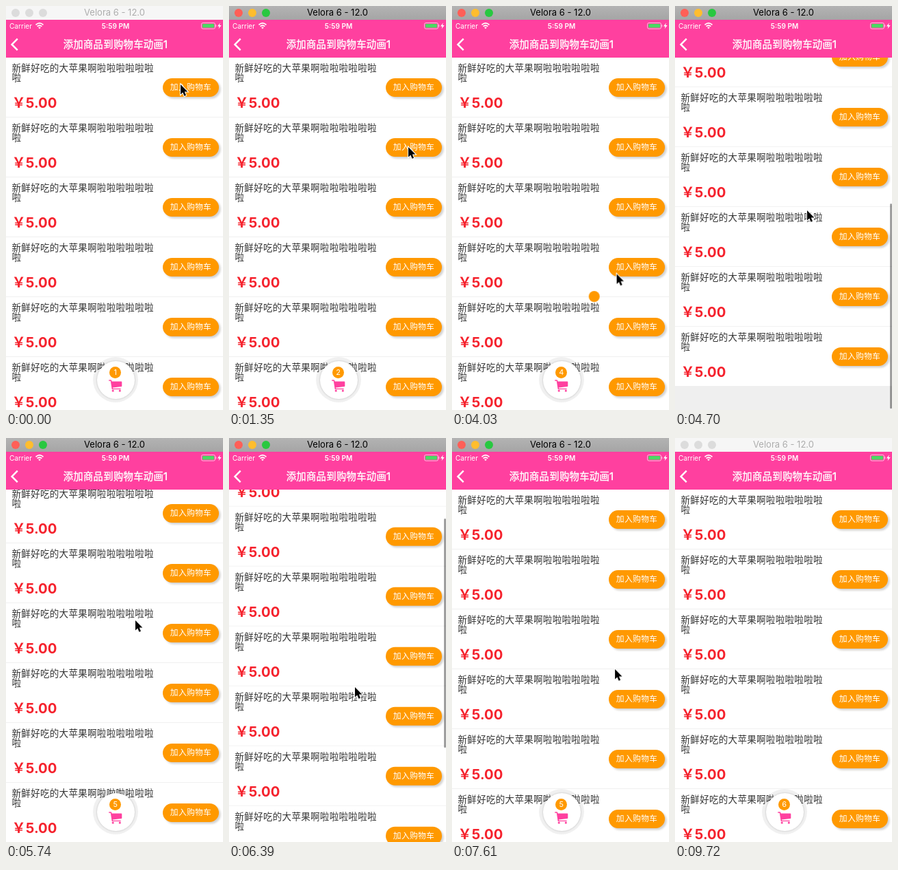
These frames come from a looping animation (317x587 px, 9750 ms). An HTML page:

```html
<!DOCTYPE html>
<html lang="zh-CN">
<head>
<meta charset="utf-8">
<title>添加商品到购物车动画1</title>
<style>
html, body { margin: 0; width: 100%; height: 100%; overflow: hidden; background: #fff; }
body { font-family: Inter, "Noto Sans CJK SC", "Noto Sans CJK", sans-serif; }
#stage { position: relative; width: 317px; height: 587px; overflow: hidden; background: #efefef; }
#stage div, #stage svg { position: absolute; white-space: nowrap; }

.bar { left: 0; top: 0; width: 317px; height: 20px; background: #f6f6f6; color: #adadad;
  font-size: 13px; line-height: 19px; text-align: center; }
.bar i { position: absolute; top: 3.5px; width: 12px; height: 12px; border-radius: 50%; background: #dcdcdc; }
.bar i:nth-of-type(1) { left: 8px; }
.bar i:nth-of-type(2) { left: 28px; }
.bar i:nth-of-type(3) { left: 48px; }
.active { background: linear-gradient(#b3b3b3, #a5a5a5); color: #000; }
.active i:nth-of-type(1) { background: #ff5f57; }
.active i:nth-of-type(2) { background: #ffbd2e; }
.active i:nth-of-type(3) { background: #28c840; }

.head { left: 0; top: 20px; width: 317px; height: 55px; background: #ff409f; color: #fff; }
.head svg { left: 0; top: -1px; }
.carrier, .clock { top: 2px; font-size: 10.1px; line-height: 14px; }
.carrier { left: 5px; }
.clock { left: 0; width: 320px; text-align: center; font-weight: 600; }
.name { left: 0; top: 26px; width: 320px; text-align: center; line-height: 20px;
  font-size: 14.37px; letter-spacing: .02em; font-weight: 500; -webkit-text-stroke: .35px #fff; }

#list { left: 0; top: 75px; width: 317px; }
.row { left: 0; width: 317px; height: 87px; background: #fff; box-shadow: inset 0 -1px #f0f0f0; }
.row .goods { left: 8.5px; top: 8px; font-size: 13.55px; letter-spacing: .02em; line-height: 14px; color: #333; }
.row .price { left: 8.5px; top: 54px; font-size: 20.3px; line-height: 24px; font-weight: 700; color: #f5222d; }
.row .add { left: 229px; top: 29.5px; width: 82px; height: 27.5px; border-radius: 14px; background: #ff9900;
  color: #fff; text-align: center; font-size: 11.83px; letter-spacing: .02em; line-height: 26.5px;
  box-shadow: 2.5px 2.5px 3px rgba(0, 0, 0, .18); }

#thumb { left: 314px; width: 2.5px; border-radius: 2px; background: rgba(0, 0, 0, .38); }
#cart { left: 127px; top: 510px; width: 66px; height: 66px; border-radius: 50%; background: rgba(0, 0, 0, .06); }
#cart .disc { left: 5.5px; top: 5.5px; width: 55px; height: 55px; border-radius: 50%; background: #fff;
  box-shadow: 0 0 3px rgba(0, 0, 0, .22); }
#cart svg { left: 23px; top: 33px; }
.badge { left: 24.2px; top: 13.5px; width: 17px; height: 17px; border-radius: 50%; overflow: hidden;
  background: #ff9900; color: #fff; font-size: 11px; line-height: 17px; text-align: center; }
#count { left: 0; top: 0; width: 17px; }
#count span { display: block; height: 17px; }

#ballX, #ballY { left: 0; top: 0; }
#ballY::before { content: ""; position: absolute; left: -8px; top: -8px; width: 16px; height: 16px;
  border-radius: 50%; background: #ff9900; }
#cursor { left: 0; top: 0; overflow: visible; }
</style>
</head>
<body>
<div id="stage">
  <div id="list"></div>
  <div id="thumb"></div>
  <div id="cart">
    <div class="disc"></div>
    <div class="badge"><div id="count"></div></div>
    <svg width="20" height="18" fill="#ff409f">
      <path d="M0 1Q0 .3.8.3H3.4Q4 .3 4.2 1L4.5 2.6H18.4Q19.3 2.6 19.3 3.4V9.2Q19.3 9.9 18.5 10L6 11.4 6.2 12.7H17Q17.8 12.7 17.8 13.4T17 14.1H5.4Q4.6 14.1 4.6 13.2L2.8 1.8H.8Q0 1.8 0 1Z"/>
      <circle cx="6.2" cy="16" r="1.6"/><circle cx="16.3" cy="16" r="1.6"/>
    </svg>
  </div>
  <div id="ballX"><div id="ballY"></div></div>

  <div class="bar"><i></i><i></i><i></i>Velora 6 - 12.0</div>
  <div class="bar active" id="active"><i></i><i></i><i></i>Velora 6 - 12.0</div>
  <div class="head">
    <div class="carrier">Carrier</div>
    <div class="clock">5:59 PM</div>
    <div class="name">添加商品到购物车动画1</div>
    <svg width="317" height="55" fill="none" stroke="#fff">
      <path d="M43.5 8.4Q49 3.4 54.5 8.4M45.6 10.7Q49 7.8 52.4 10.7" stroke-width="1.7"/>
      <path d="M47.2 12.3Q49 10.9 50.8 12.3L49 14.2Z" fill="#fff" stroke="none"/>
      <rect x="285.5" y="5.5" width="20" height="8.6" rx="2.2" stroke-opacity=".65"/>
      <rect x="287" y="7" width="17" height="5.6" rx="1" fill="#4cd964" stroke="none"/>
      <path d="M306.8 8.2V11.4" stroke-opacity=".65"/>
      <path d="M312.8 5.5L309 10.4H311.6L310.6 14.2 314.6 9H312Z" fill="#fff" stroke="none"/>
      <path d="M16.8 28.6L8.6 36.9 16.8 45.2" stroke-width="2.5"/>
    </svg>
  </div>
  <svg id="cursor" width="14" height="20">
    <path d="M0 0V14.6L3.3 11.5 5.5 16.8 8 15.7 5.8 10.6H10.4Z" stroke="#fff" stroke-width="2" paint-order="stroke"/>
  </svg>
</div>
<script>
const LOOP = 9750, ROW = 87, ROWS = 9, END = 270, FLIGHT = 500;
const $ = id => document.getElementById(id);
const sheet = document.head.appendChild(document.createElement('style'));

// Turns [ms, css, easing] steps into a looping CSS animation.
let serial = 0;
function track(el, steps, ease = 'linear') {
  const name = 'k' + serial++;
  const full = [[0, steps[0][1]], ...steps, [LOOP, steps[steps.length - 1][1]]];
  const body = full.map(([ms, css, e = ease]) =>
    `${(ms / LOOP * 100).toFixed(4)}%{${css};animation-timing-function:${e}}`).join('');
  sheet.textContent += `@keyframes ${name}{${body}}\n`;
  const old = el.style.animation;
  el.style.animation = (old ? old + ', ' : '') + `${name} ${LOOP}ms linear infinite`;
}

const clicks = [
  { row: 0, down: 120, up: 250 },
  { row: 1, down: 1450, up: 1560 },
  { row: 2, down: 2580, up: 2720 },
  { row: 3, down: 3640, up: 3750 },
  { row: 2, down: 8120, up: 8240 }
];

for (let i = 0; i < ROWS; i++) {
  $('list').insertAdjacentHTML('beforeend', `<div class="row" style="top:${i * ROW}px">
    <div class="goods">新鲜好吃的大苹果啊啦啦啦啦啦啦<br>啦</div>
    <div class="price">￥5.00</div><div class="add">加入购物车</div></div>`);
}
document.querySelectorAll('.add').forEach((button, row) => {
  const mine = clicks.filter(c => c.row === row);
  if (mine.length) track(button, mine.flatMap(c => [
    [c.down, 'opacity:1'], [c.down + 40, 'opacity:.7'],
    [c.up, 'opacity:.7'], [c.up + 120, 'opacity:1']
  ]));
});

// Ball flight, badge number and cart bounce for every click.
const fall = 'cubic-bezier(.45,.05,.85,.5)';
track($('ballX'), [
  [0, 'translate:0 0;visibility:hidden', 'step-end'],
  ...clicks.flatMap(c => [
    [c.up, 'translate:269px 0;visibility:visible'],
    [c.up + FLIGHT, 'translate:160px 0;visibility:hidden', 'step-end']
  ])
]);
track($('ballY'), clicks.flatMap(c => [
  [c.up, `translate:0 ${118 + c.row * ROW}px`, fall],
  [c.up + FLIGHT, 'translate:0 532px', 'step-end']
]));
$('count').innerHTML = [1, 2, 3, 4, 5, 6].map(n => `<span>${n}</span>`).join('');
track($('count'), [[0, 'translate:0 0'],
  ...clicks.map((c, i) => [c.up + FLIGHT, `translate:0 ${-17 * (i + 1)}px`])], 'step-end');
track($('cart'), clicks.flatMap(({ up }) => [
  [up + FLIGHT, 'scale:1'], [up + FLIGHT + 90, 'scale:.86'], [up + FLIGHT + 230, 'scale:1']
]), 'ease-in-out');

// The cart leaves while the list scrolls.
const shown = 'translate:0 0', gone = 'translate:0 80px';
track($('cart'), [
  [4390, shown], [4590, gone], [5400, gone], [5680, shown],
  [5940, shown], [6140, gone], [7120, gone], [7400, shown]
], 'ease-in-out');

const settle = 'cubic-bezier(.2,.6,.3,1)';
const scroll = [
  [4370, 0], [4450, 40], [4540, 140], [4640, END], [4700, 305], [4740, 309, settle], [5270, END],
  [5930, END], [6100, 230], [6250, 150], [6390, 63], [6490, 0], [6560, -27], [6620, -32, settle], [7060, 0]
];
function thumb(s) {
  const over = Math.max(0, -s, s - END), size = 333 - over;
  const top = s > END ? 585 - size : 76 + Math.max(0, s) * .652;
  return `top:${top}px;height:${size}px`;
}
track($('list'), scroll.map(([ms, s, e]) => [ms, `translate:0 ${-s}px`, e]));
track($('thumb'), scroll.map(([ms, s, e]) => [ms, thumb(s), e]));
track($('thumb'), [
  [4370, 'opacity:0'], [4420, 'opacity:1'], [5280, 'opacity:1'], [5550, 'opacity:0'],
  [5930, 'opacity:0'], [5980, 'opacity:1'], [7060, 'opacity:1'], [7330, 'opacity:0']
]);

track($('active'), [[0, 'opacity:0'], [120, 'opacity:1'], [9720, 'opacity:0']], 'step-end');

track($('cursor'), [
  [0, 255, 114], [400, 255, 114], [1120, 260, 196], [1350, 262, 205], [1700, 262, 206],
  [2110, 262, 212], [2480, 262, 297], [2780, 262, 297], [3100, 264, 343], [3450, 264, 380],
  [3850, 264, 380], [4330, 202, 405], [4370, 201, 405], [4560, 194, 300], [4700, 193, 297],
  [5100, 191, 285], [5600, 189, 265], [5930, 189, 265], [6250, 185, 352], [6390, 184, 362],
  [7000, 184, 365], [7450, 225, 343], [7610, 238, 336], [7980, 262, 297], [8400, 262, 297],
  [8880, 276, 381], [9220, 270, 590]
].map(([ms, x, y]) => [ms, `translate:${x}px ${y}px`]));
</script>
</body>
</html>
```
